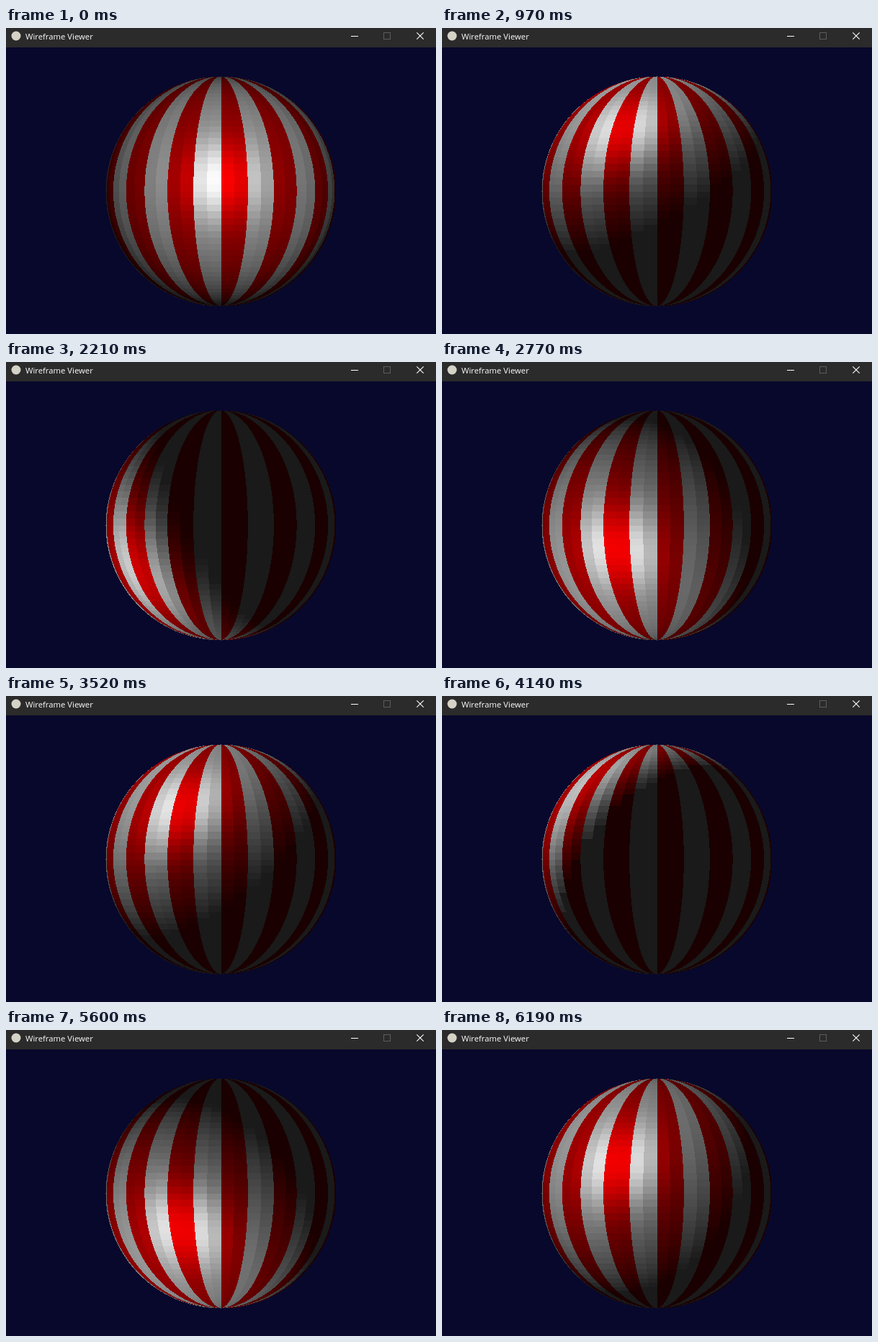
Recreate the animation shown at these times as an HTML page with a canvas. Size 597 by 426 pixels, loop 6230 ms.

```html
<!DOCTYPE html>
<html lang="en">
<head>
<meta charset="utf-8">
<title>Wireframe Viewer</title>
<style>
  html, body { margin: 0; width: 100%; height: 100%; overflow: hidden; background: #08082c; }
  .bar { position: absolute; left: 0; top: 0; width: 597px; height: 27px; background: #2b2b2b; }
  .bar svg { position: absolute; left: 0; top: 0; }
  canvas { position: absolute; left: 0; top: 27px; }
  text { font: 11.3px "Open Sans", "Noto Sans", sans-serif; fill: #fff; }
</style>
</head>
<body>
<div class="bar">
  <svg width="597" height="27">
    <circle cx="14" cy="11" r="6.5" fill="#d5d2c6"/>
    <text x="27" y="16">Wireframe Viewer</text>
    <g fill="none">
      <path d="M479 11.5h10" stroke="#fff"/>
      <rect x="524.5" y="6.5" width="9" height="9" stroke="#5c5c5c"/>
      <path d="M570.3 6.300l9.400 9.400m0 -9.400l-9.400 9.400" stroke="#fff" stroke-width="1.1"/>
    </g>
  </svg>
</div>
<canvas width="597" height="399"></canvas>
<script>
const LOOP = 6230;
const CX = 298, CY = 200, R = 160;
const CELLS = 52, HALF = CELLS / 2;
const LON = 2 * Math.PI / CELLS, LAT = Math.PI / CELLS;
const AMBIENT = 0.1, DIFFUSE = 0.5, SPECULAR = 0.4, SHINE = 4;

// Runs of redraws: first time, last time, count
const runs = [
  [70, 650, 8], [730, 1280, 8], [1360, 1980, 9], [2060, 2610, 8], [2690, 3280, 8],
  [3360, 3910, 8], [3990, 4580, 9], [4650, 5270, 9], [5360, 5940, 8], [6030, 6190, 3]
];
const ticks = [0];
for (const [first, last, count] of runs) {
  for (let i = 0; i < count; i++) {
    ticks.push(Math.round((first + (last - first) * i / (count - 1)) / 10) * 10);
  }
}

// Light path: time, angle around the x axis in degrees, x component
const path = [
  [0, 11, 0], [970, 72, -0.47], [1670, 163, -0.95], [2770, 333, -0.61],
  [4140, 495, -0.58], [5040, 617, -0.57], [6190, 756, -0.6]
];

function slope(i, col) {
  const a = path[Math.max(i - 1, 0)], b = path[Math.min(i + 1, path.length - 1)];
  return (b[col] - a[col]) / (b[0] - a[0]);
}

function follow(t, col) {
  let i = 0;
  while (i < path.length - 2 && t >= path[i + 1][0]) i++;
  const a = path[i], b = path[i + 1], span = b[0] - a[0];
  const u = (t - a[0]) / span, v = 1 - u;
  return v * v * (1 + 2 * u) * a[col] + u * u * (3 - 2 * u) * b[col]
    + span * u * v * (v * slope(i, col) - u * slope(i + 1, col));
}

function lightAt(t) {
  const x = Math.max(-0.98, follow(t, 2));
  const angle = follow(t, 1) * Math.PI / 180;
  const r = Math.sqrt(1 - x * x);
  return [x, r * Math.sin(angle), r * Math.cos(angle)];
}

const canvas = document.querySelector("canvas");
const ctx = canvas.getContext("2d");
const { width, height } = canvas;
const image = ctx.createImageData(width, height);
const pixels = new Uint32Array(image.data.buffer);
const rgb = (r, g, b) => (255 << 24 | b << 16 | g << 8 | r) >>> 0;
pixels.fill(rgb(8, 8, 44));

// Visible cells, top row first, with their normals
const cells = [];
for (let row = 0; row < CELLS; row++) {
  for (let col = 0; col < HALF; col++) {
    const lat = (HALF - row - 0.5) * LAT;
    const lon = (col - HALF / 2 + 0.5) * LON;
    cells.push({
      n: [Math.cos(lat) * Math.sin(lon), Math.sin(lat), Math.cos(lat) * Math.cos(lon)],
      red: Math.floor((col - HALF / 2) / 2) % 2 === 0
    });
  }
}

const arc = s => Math.asin(Math.max(-1, Math.min(1, s)));
const clampIndex = (v, count) => Math.max(0, Math.min(count - 1, Math.floor(v)));

// Shared edge pixels belong to the outer cell; the middle line to the left or upper one
const edge = d => d > 0 ? d + 1 : d - 0.001;

// Which cell each pixel of the ball shows
const spots = [];
for (let py = 0; py < height; py++) {
  for (let px = 0; px < width; px++) {
    const dx = px - CX, dy = py - CY;
    if (dx * dx + dy * dy > R * R) continue;
    const chord = Math.sqrt(Math.max(1, R * R - (dy + 0.5) ** 2));
    const col = clampIndex(arc(edge(dx) / chord) / LON + HALF / 2, HALF);
    const row = clampIndex(arc(edge(dy) / R) / LAT + HALF, CELLS);
    spots.push([py * width + px, row * HALF + col]);
  }
}

function shade({ n, red }, light) {
  const facing = n[0] * light[0] + n[1] * light[1] + n[2] * light[2];
  let level = AMBIENT;
  if (facing > 0) {
    const mirror = Math.max(0, 2 * facing * n[2] - light[2]);
    level += DIFFUSE * facing + SPECULAR * mirror ** SHINE;
  }
  const v = Math.round(255 * Math.min(1, level));
  return red ? rgb(v, 0, 0) : rgb(v, v, v);
}

let shown = -1;
function draw(now) {
  const t = now % LOOP;
  let tick = 0;
  for (const start of ticks) if (start <= t) tick = start;
  if (tick !== shown) {
    shown = tick;
    const light = lightAt(tick);
    const colors = cells.map(cell => shade(cell, light));
    for (const [at, cell] of spots) pixels[at] = colors[cell];
    ctx.putImageData(image, 0, 0);
  }
}

function loop() {
  draw(performance.now());
  requestAnimationFrame(loop);
}
loop();
</script>
</body>
</html>
```
